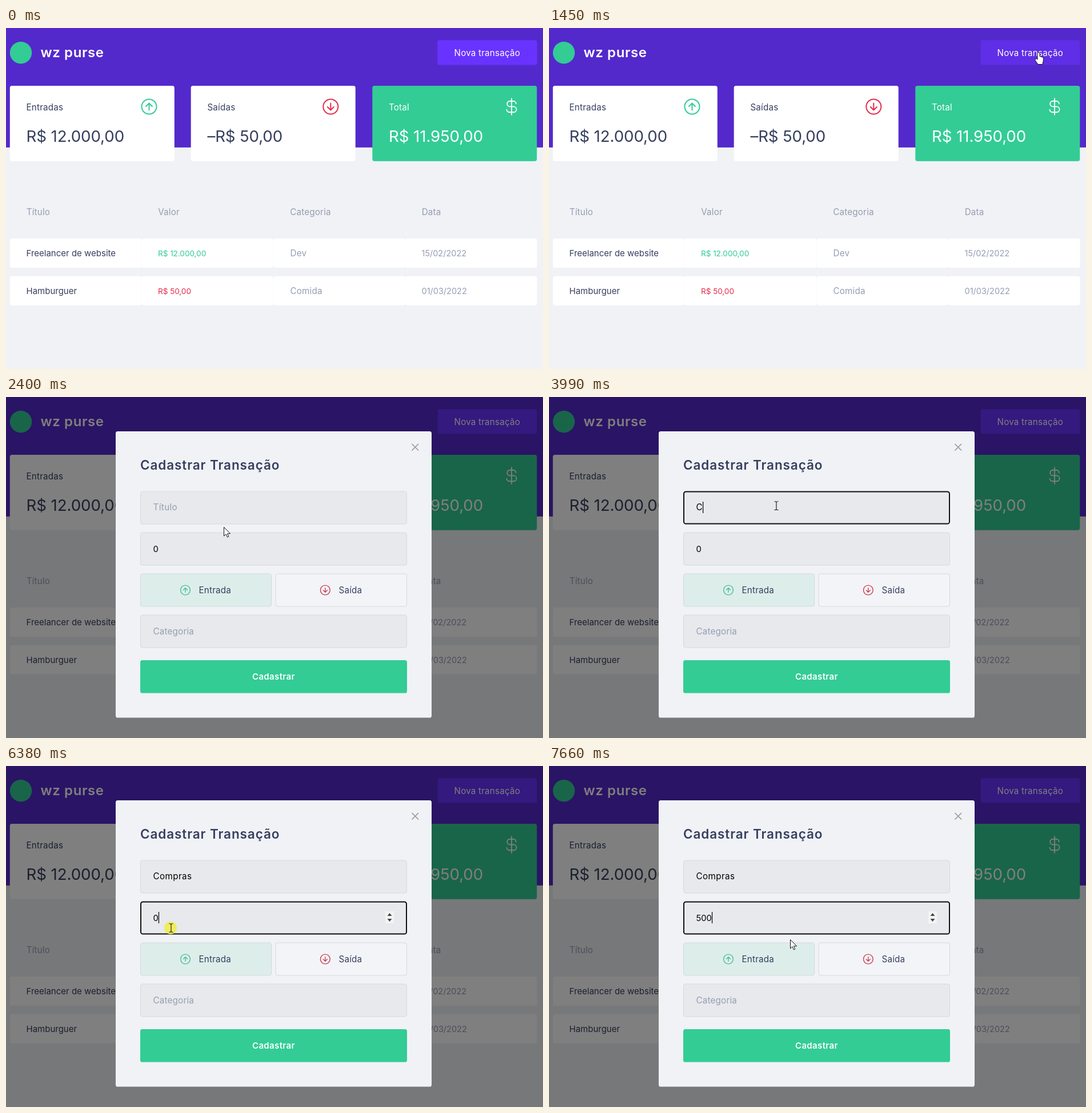
Animation, 940 px wide and 596 px high, one loop 8000 ms. Source, as an HTML page:

```html
<!DOCTYPE html>
<html lang="pt-BR">
<head>
<meta charset="utf-8">
<title>Transações</title>
<style>
  html, body { margin: 0; width: 100%; height: 100%; overflow: hidden; background: #f0f2f5; }
  svg { display: block; width: 940px; height: 596px; }
  text { font-family: Inter, "Open Sans", sans-serif; white-space: pre; }
  .fallback text { font-family: "Liberation Sans", Arial, sans-serif; }
</style>
</head>
<body>
<svg id="stage" viewBox="0 0 940 596"></svg>
<script>
const LOOP = 8000, STEP = 66.6;
const GREEN = '#33cc95', RED = '#e52e4d', TITLE = '#363f5f', MUTED = '#969cb3';

const rect = (x, y, w, h, fill, extra = '') =>
  `<rect x="${x}" y="${y}" width="${w}" height="${h}" fill="${fill}" ${extra}/>`;
const box = (x, y, w, h, fill, extra = '') => rect(x, y, w, h, fill, `rx="3.6" ${extra}`);
const text = (x, y, str, fill, size = 15.2, weight = 400, spacing = 0.2, extra = '') =>
  `<text x="${x}" y="${y}" fill="${fill}" font-size="${size}" font-weight="${weight}" letter-spacing="${spacing}" ${extra}>${str}</text>`;
const group = (id, content, extra = '') => `<g id="${id}" ${extra}>${content}</g>`;

const arrowIcon = (x, y, r, color, turn, width) =>
  `<g transform="translate(${x} ${y}) rotate(${turn})" fill="none" stroke="${color}" stroke-width="${width}" stroke-linecap="round" stroke-linejoin="round">
    <circle r="${r}"/><path d="M0 ${r * .46}V${-r * .46}M${-r * .42} ${-r * .04}L0 ${-r * .46}L${r * .42} ${-r * .04}"/></g>`;
const dollarIcon = (x, y) =>
  `<path transform="translate(${x} ${y}) scale(1.3) translate(-12 -12)" fill="none" stroke="#fff" stroke-width="1.4" stroke-linecap="round"
    d="M12 1V23M18 8a3.7 3.7 0 0 0-3.7-3.5H9.7a3.7 3.7 0 0 0 0 7.4h5.1a3.8 3.8 0 0 1 0 7.6H9.2a3.8 3.8 0 0 1-3.8-3.6"/>`;

const card = (x, fill, label, amount, color) =>
  box(x, 101, 288, 131.7, fill) + text(x + 28.7, 143.5, label, color) +
  text(x + 28.7, 199, amount, color, 27.7, 400, -0.1);

const columns = [7, 237.5, 468.5, 699];
const row = (y, title, value, color, category, date) =>
  columns.map(x => box(x, y, 230.5, 51, '#fff')).join('') +
  text(35.5, y + 31, title, TITLE, 15, 400, 0) + text(266, y + 31, value, color, 13.7, 400, -0.1) +
  text(497.5, y + 31, category, MUTED) + text(727.5, y + 31, date, MUTED, 14.5, 400, 0);

const page = rect(0, 0, 940, 596, '#f0f2f5') + rect(0, 0, 940, 208.8, '#5429cc') +
  `<circle cx="26" cy="43.2" r="19.2" fill="${GREEN}"/>` +
  text(60.5, 51, 'wz purse', '#fff', 24, 600, 0.6) +
  box(755.5, 21.3, 174, 43.2, '#6933ff', 'id="newButton"') + text(784.5, 48.5, 'Nova transação', '#fff') +
  card(6.8, '#fff', 'Entradas', 'R$ 12.000,00', TITLE) +
  card(323.7, '#fff', 'Saídas', '–R$ 50,00', TITLE) +
  card(641.3, GREEN, 'Total', 'R$ 11.950,00', '#fff') +
  arrowIcon(250.5, 137.5, 13, GREEN, 0, 2) + arrowIcon(568.3, 137.5, 13, RED, 180, 2) + dollarIcon(885, 137.5) +
  ['Título', 'Valor', 'Categoria', 'Data'].map((s, i) => text(columns[i] + 28.7, 327, s, MUTED)).join('') +
  row(368, 'Freelancer de website', 'R$ 12.000,00', GREEN, 'Dev', '15/02/2022') +
  row(433.7, 'Hamburguer', 'R$ 50,00', RED, 'Comida', '01/03/2022');

const border = 'stroke="#d7d8dc" stroke-width="1"';
const field = y => box(235.5, y, 466, 57, '#e7e9ec', border);
const focusRing = (id, y) => box(236, y + .5, 465, 56, 'none', `id="${id}" stroke="#111" stroke-width="2"`);

const form =
  field(165) + field(237) + field(381) +
  box(235.5, 309, 229, 57, '#ddeeea', border) + box(472, 309, 229.5, 57, '#f2f4f7', border) +
  text(337.5, 342.5, 'Entrada', TITLE) + text(582.5, 342.5, 'Saída', TITLE) +
  text(257.5, 414.5, 'Categoria', MUTED) +
  box(235, 460, 467, 57.5, GREEN) +
  focusRing('ring1', 165) + focusRing('ring2', 237) +
  rect(257.5, 254, 9.5, 21, '#0078d7', 'id="selection"') +
  text(257.5, 198, '', '#000', 15.2, 400, 0.4, 'id="value1"') +
  text(257.5, 270.5, '', '#000', 14.8, 400, 0, 'id="value2"') +
  group('spinner', rect(664, 254, 15, 21, '#f3f3f4') + '<path fill="#444" d="M667.5 262L671.5 257L675.5 262ZM667.5 267L671.5 272L675.5 267Z"/>') +
  rect(0, 0, 1.2, 20, '#000', 'id="caret"');

const modalLabels = (title, button, weight) =>
  text(235, 127, 'Cadastrar Transação', TITLE, title.size, weight, title.spacing) +
  text(button.x, button.y, 'Cadastrar', '#fff', button.size, weight, button.spacing);

const modal = rect(0, 0, 940, 596, '#000', 'opacity=".5"') +
  box(192, 60, 553, 500.5, '#f0f2f5', 'id="panel"') + group('form', form) +
  group('plainLabels', modalLabels({ size: 22.4, spacing: 0 }, { x: 435, y: 490.5, size: 14.4, spacing: 0 }, 700), 'class="fallback"') +
  group('loaded', modalLabels({ size: 22.5, spacing: 0.9 }, { x: 431, y: 494, size: 15, spacing: 0.35 }, 600) +
    '<path d="M710.5 82L722 93.5M722 82L710.5 93.5" stroke="#9c979f" stroke-width="1.7"/>' +
    arrowIcon(314, 337.5, 8.4, '#4cbf98', 0, 1.4) + arrowIcon(558.8, 337.5, 8.4, '#cc4058', 180, 1.4));

const cursor = group('cursor',
  '<circle id="click" cx="-1" r="11" fill="#efec4e" opacity=".9"/>' +
  '<path id="arrow" fill="#fff" stroke="#111" d="M.5.5V16L4 12.7L6.5 18L8.8 17L6.5 11.8H11.5Z"/>' +
  '<path id="hand" fill="#fff" stroke="#111" d="M-2 2Q0-1 2 2V7.5L7 9Q9 10 8.5 14L7 21.5H-1L-6 14.5Q-6.5 11-4 11.5L-2 13Z"/>' +
  '<path id="beam" fill="none" stroke="#222" stroke-width="1.2" d="M-3.5-7.5Q0-7.5 0-6Q0-7.5 3.5-7.5M0-6.5V6.5M-3.5 7.5Q0 7.5 0 6Q0 7.5 3.5 7.5"/>');

const stage = document.getElementById('stage');
stage.innerHTML = page + group('modal', modal) + cursor;
const el = {};
stage.querySelectorAll('[id]').forEach(node => el[node.id] = node);
const show = (id, on) => el[id].style.display = on ? '' : 'none';
const between = (t, a, b) => t >= a && t < b;

// time, x, y
const route = [
  [500, 622, 182], [700, 680, 130], [960, 830, 36], [1030, 848, 31], [1166, 857, 42], [1580, 857, 42], [1581, 855, 41], [2059, 855, 41],
  [2060, 846, 34], [2393, 381, 227], [2460, 384, 232], [2590, 398, 190],
  [5980, 398, 190], [6310, 289, 283], [6400, 289, 283], [6512, 180, 282], [6590, 184, 284],
  [6712, 408, 306], [6779, 420, 305], [6846, 422, 303]
];
const typed = [[3990, 'C'], [4320, 'Co'], [4520, 'Com'], [4860, 'Comp'], [5250, 'Compr'], [5300, 'Compra'], [5450, 'Compras']];
const amounts = [[0, '0'], [7280, '5'], [7600, '50'], [7660, '500']];
const latest = (steps, t, start) => steps.reduce((v, [at, s]) => t >= at ? s : v, start);

function pointerAt(time) {
  const start = latest([500, 2060, 5980].map(s => [s, s]), time, 500);
  const t = start + Math.floor((time - start) / STEP) * STEP;
  const i = route.findIndex(p => p[0] > t);
  if (i < 0) return route[route.length - 1].slice(1);
  if (i === 0) return route[0].slice(1);
  const [t0, x0, y0] = route[i - 1], [t1, x1, y1] = route[i], k = (t - t0) / (t1 - t0);
  return [Math.round(x0 + (x1 - x0) * k), Math.round(y0 + (y1 - y0) * k)];
}

function render(t) {
  const ready = t >= 1650, open = t >= 1580;
  const first = between(t, 2730, 6380), second = t >= 6380, selected = between(t, 6470, 7280);

  el.newButton.setAttribute('fill', between(t, 1370, 1650) ? '#5f2ee6' : '#6933ff');
  show('modal', open);
  show('plainLabels', !ready);
  show('loaded', ready);
  el.panel.setAttribute('y', ready ? 60 : 63);
  el.panel.setAttribute('height', ready ? 500.5 : 494.5);
  el.form.setAttribute('transform', `translate(0 ${ready ? 0 : -3})`);

  el.value1.textContent = latest(typed, t, 'Título');
  el.value1.setAttribute('fill', t < 3990 ? MUTED : '#000');
  el.value2.textContent = latest(amounts, t, '0');
  el.value2.setAttribute('fill', selected ? '#fff' : '#000');
  show('selection', selected);
  show('ring1', first);
  show('ring2', second);
  show('spinner', second);

  const blinkOff = between(t, 3260, 3790) || between(t, 5980, 6380);
  show('caret', (first || second) && !blinkOff && !selected);
  if (open) {
    const width = second ? el.value2.getComputedTextLength() : t < 3990 ? -.5 : el.value1.getComputedTextLength();
    el.caret.setAttribute('x', 257.5 + width);
    el.caret.setAttribute('y', second ? 255 : 183);
  }

  const [x, y] = pointerAt(t);
  const beam = between(t, 2526, 6700), hand = t < 1580 && x > 755 && y < 64;
  show('cursor', t >= 500);
  el.cursor.setAttribute('transform', `translate(${x} ${y})`);
  show('beam', beam);
  show('hand', hand);
  show('arrow', !beam && !hand);
  show('click', between(t, 1370, 1450) || between(t, 2730, 2800) || between(t, 6380, 6600));
}

const begin = performance.now();
function tick() {
  render((performance.now() - begin) % LOOP);
  requestAnimationFrame(tick);
}
tick();
</script>
</body>
</html>
```
